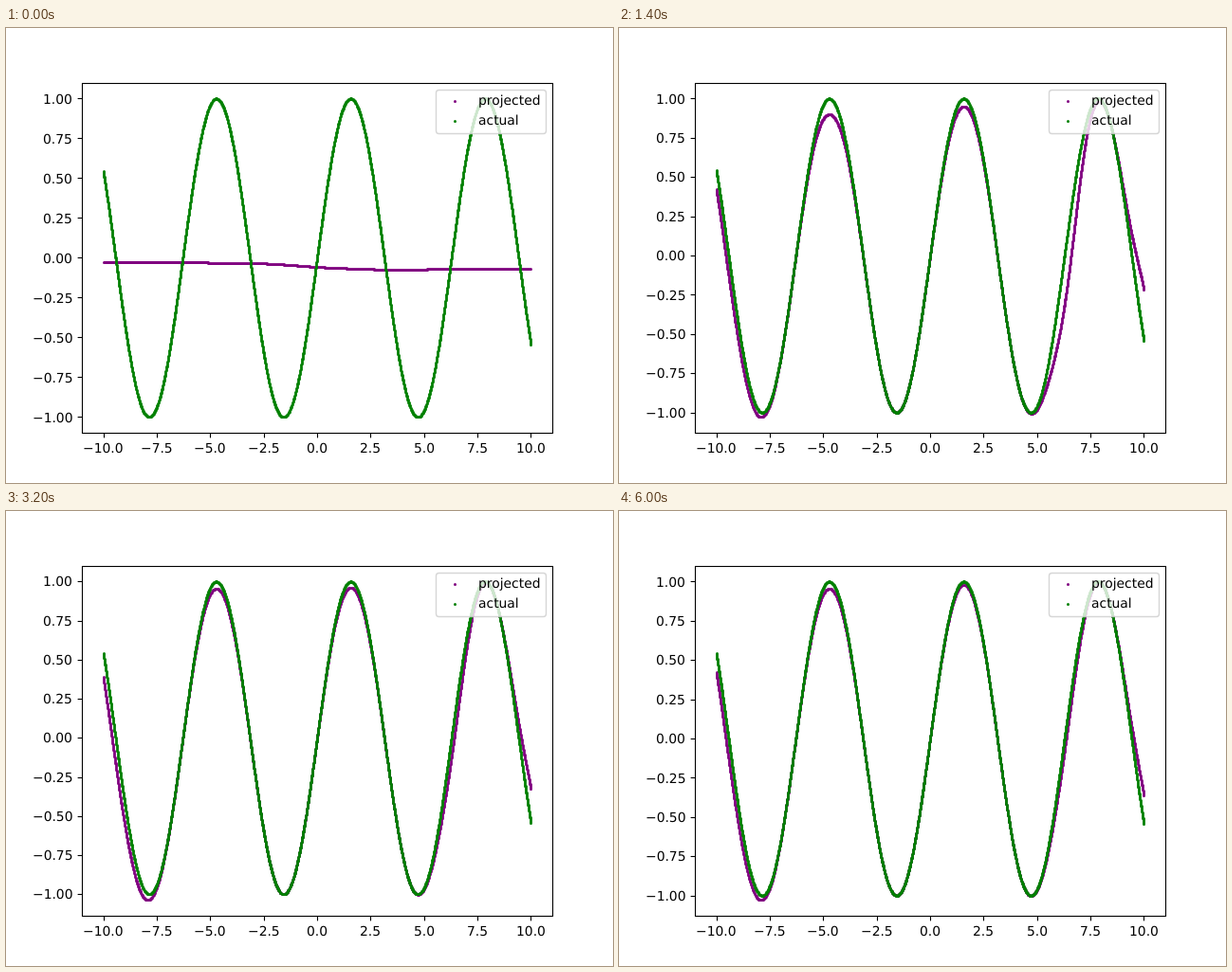
Animation, 640 px wide and 480 px high, one loop 6100 ms. Source, as an HTML page with a canvas:

```html
<!DOCTYPE html>
<html lang="en">
<head>
<meta charset="utf-8">
<title>Sine fit</title>
<style>
html, body { margin: 0; width: 100%; height: 100%; overflow: hidden; background: #fff; }
canvas { display: block; }
</style>
</head>
<body>
<canvas id="plot" width="640" height="480"></canvas>
<script>
const ctx = document.getElementById('plot').getContext('2d');
const LOOP = 6100, STEP = 100;
const SPREAD_END = 600, TAIL_END = 1400, END = 6000;
const LEFT = 80, RIGHT = 576, TOP = 57.6, BOTTOM = 427.2;

const { exp, sin, tanh, round, min, max } = Math;
const clamp = v => min(1, max(0, v));
const mix = (a, b, w) => a + (b - a) * w;
const sigmoid = v => 1 / (1 + exp(-v));
const bump = (x, center, width) => exp(-(((x - center) / width) ** 2));

const xs = Array.from({ length: 4001 }, (_, i) => -10 + i / 200);
const actual = xs.map(sin);

const untrained = x => -.03 - .037 * sigmoid(1.1 * (x + .9)) - .008 * bump(x, 3.8, 2);
const plateau = x => .493 * tanh(2.1 * (x - 6.22));

// The fit spreads out from the centre, then learns the right tail, then refines
function projectedAt(t) {
  const spread = t / SPREAD_END;
  const tail = 1 - (1 - clamp((t - SPREAD_END) / (TAIL_END - SPREAD_END))) ** 3;
  const refine = clamp((t - TAIL_END) / (END - TAIL_END));

  const leftError = .13 + .04 * sin(Math.PI * refine);
  const firstPeak = .045 + .055 * bump(t, TAIL_END, 400);
  const secondPeak = mix(.05, .02, refine);
  const rise = tail * (.15 - .07 * refine + .17 * exp(-15 * refine));
  const rightEnd = tail * (.19 + .16 * exp(-3.3 * refine));

  return xs.map(x => {
    const fit = sin(x)
      - leftError * bump(x, -9.6, 1.4)
      - firstPeak * bump(x, -4.71, .9)
      - secondPeak * bump(x, 1.57, .9)
      - rise * bump(x, 6.4, .85)
      + rightEnd * bump(x, 10.2, .8);
    const flat = sigmoid(8 * (x - 6.4)) * (1 - tail);
    const learned = mix(fit, plateau(x), flat);
    const reach = 20 * Math.sqrt(spread) - 5;
    const weight = spread && sigmoid(1.5 * (reach - Math.abs(x)));
    return mix(untrained(x), learned, weight);
  });
}

const toX = x => (LEFT + RIGHT) / 2 + x * (RIGHT - LEFT) / 22;
const snap = v => round(v) + .5;
const label = (v, digits) => v.toFixed(digits).replace('-', '\u2212');

function dots(points, color) {
  ctx.fillStyle = color;
  ctx.beginPath();
  for (const [x, y] of points) {
    ctx.moveTo(snap(x) + 1.5, snap(y));
    ctx.arc(snap(x), snap(y), 1.5, 0, 7);
  }
  ctx.fill();
}

function line(x1, y1, x2, y2) {
  ctx.beginPath();
  ctx.moveTo(x1, y1);
  ctx.lineTo(x2, y2);
  ctx.stroke();
}

// anchor: 0 left, .5 centre, 1 right
function text(str, x, y, anchor = 0) {
  ctx.fillText(str, round(x - anchor * ctx.measureText(str).width), y);
}

function draw(t) {
  const projected = projectedAt(t);
  const low = min(-1, ...projected), high = max(1, ...projected);
  const pad = (high - low) / 20;
  const toY = y => BOTTOM - (y - low + pad) / (high - low + 2 * pad) * (BOTTOM - TOP);
  const plot = (ys, color) => dots(ys.map((y, i) => [toX(xs[i]), toY(y)]), color);

  ctx.fillStyle = '#fff';
  ctx.fillRect(0, 0, 640, 480);
  plot(projected, 'purple');
  plot(actual, 'green');

  ctx.font = '13.889px "DejaVu Sans", sans-serif';
  ctx.textRendering = 'geometricPrecision';
  ctx.fillStyle = ctx.strokeStyle = '#000';
  ctx.lineWidth = 1.11;
  ctx.strokeRect(80.5, 58.5, 496, 369);
  for (let i = -4; i <= 4; i++) {
    const x = toX(i * 2.5), y = toY(i / 4);
    line(snap(x), 427.5, snap(x), 432.4);
    text(label(i * 2.5, 1), x, 448, .5);
    line(75.6, snap(y), 80.5, snap(y));
    text(label(i / 4, 2), 70.3, round(y + 5.1), 1);
  }

  ctx.beginPath();
  ctx.roundRect(453.5, 65.5, 116, 46, 3);
  ctx.fillStyle = 'rgba(255,255,255,.8)';
  ctx.fill();
  ctx.strokeStyle = 'rgba(204,204,204,.8)';
  ctx.lineWidth = 1.39;
  ctx.stroke();
  dots([[473, 77]], 'purple');
  dots([[473, 98]], 'green');
  ctx.fillStyle = '#000';
  text('projected', 498, 81);
  text('actual', 498, 102);
}

let shown = -1;
function tick() {
  const t = Math.floor(performance.now() % LOOP / STEP) * STEP;
  if (t !== shown) draw(shown = t);
  requestAnimationFrame(tick);
}
tick();
</script>
</body>
</html>
```
